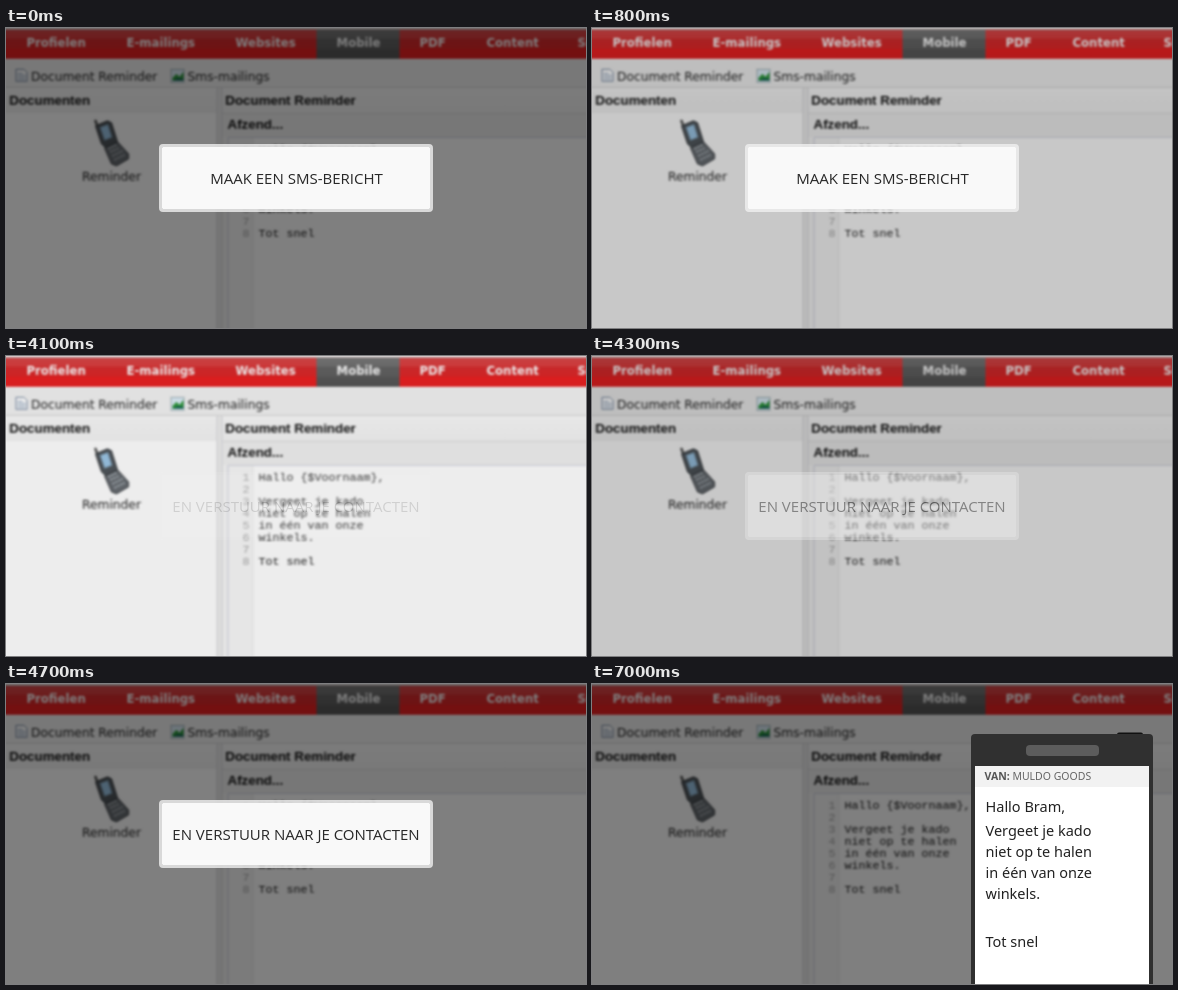
Write an HTML page that moves like this. It is 580x300 px and loops after 8 s.

```html
<!DOCTYPE html>
<html lang="nl">
<head>
<meta charset="utf-8">
<title>Sms-bericht</title>
<style>
html, body { margin: 0; width: 100%; height: 100%; overflow: hidden; background: #fff; }
svg { display: block; }
text { white-space: pre; }
.nav { font: bold 11.7px "DejaVu Sans", sans-serif; fill: #fff; }
.ui { font: 12.25px "DejaVu Sans", sans-serif; fill: #222; }
.head { font: bold 13.35px "Liberation Sans", Arial, sans-serif; fill: #111; }
.code { font: 11.67px "Liberation Mono", monospace; fill: #1c1c1c; }
.code .num { fill: #a5a5a5; text-anchor: end; }
.title { font: 15px "Open Sans", "Noto Sans", sans-serif; fill: #282828; text-anchor: middle; }
.sms { font: 14.5px "Noto Sans", sans-serif; fill: #222; }
.from { font: 10.5px "Noto Sans", sans-serif; fill: #666; }
.from tspan { font-weight: bold; fill: #555; }

.page, .shade, .ask, .send, .phone { animation: 8s infinite step-end; }
.page { animation-name: page; }
.shade { animation-name: shade; }
.ask { animation-name: ask; }
.send { animation-name: send; }
.phone { animation-name: phone; }

/* The blurred page also sits slightly lower than the sharp one. */
@keyframes page {
  0%, 51.25%, 100% { filter: blur(1.25px); transform: translate(.5px, .8px); }
  13.75% { filter: none; transform: none; }
}
@keyframes shade {
  0% { opacity: 1; }
  6.25% { opacity: 1; animation-timing-function: steps(7, start); }
  15% { opacity: 0; }
  51.25% { opacity: 0; animation-timing-function: steps(7, start); }
  60%, 100% { opacity: 1; }
}
@keyframes ask {
  0% { opacity: 1; }
  13.75%, 100% { opacity: 0; }
}
@keyframes send {
  0% { opacity: 0; }
  51.25% { opacity: 0; animation-timing-function: steps(7, start); }
  60% { opacity: 1; }
  87.5%, 100% { opacity: 0; }
}
@keyframes phone {
  0% { transform: translateX(202px); }
  83.75% { transform: translateX(202px); animation-timing-function: steps(4, start); }
  88.75%, 100% { transform: none; }
}
</style>
</head>
<body>
<svg width="580" height="300" viewBox="0 0 580 300">
  <defs>
    <linearGradient id="red" x2="0" y2="1">
      <stop offset="0" stop-color="#d64a4b"/><stop offset=".32" stop-color="#db3c3d"/>
      <stop offset=".32" stop-color="#d62c2e"/><stop offset=".66" stop-color="#de2728"/>
      <stop offset=".66" stop-color="#ec2021"/><stop offset="1" stop-color="#e62122"/>
    </linearGradient>
    <linearGradient id="grey" x2="0" y2="1">
      <stop offset="0" stop-color="#7a7a7a"/><stop offset=".32" stop-color="#707070"/>
      <stop offset=".32" stop-color="#646464"/><stop offset=".66" stop-color="#606060"/>
      <stop offset=".66" stop-color="#595959"/><stop offset="1" stop-color="#555"/>
    </linearGradient>
    <linearGradient id="bar" x2="0" y2="1">
      <stop offset="0" stop-color="#f9f9f9"/><stop offset="1" stop-color="#f3f3f3"/>
    </linearGradient>
    <g id="box">
      <rect x="154.5" y="117.5" width="271" height="65" rx="2.5" fill="none" stroke="#f0f0f0" stroke-opacity=".8" stroke-width="3"/>
      <rect x="156" y="119" width="268" height="62" rx="1" fill="#f9f9f9"/>
    </g>
  </defs>

  <g class="page">
    <rect x="-10" y="30" width="600" height="280" fill="#fff"/>
    <rect x="-10" width="600" height="30" fill="url(#red)"/>
    <rect x="310" width="83" height="30" fill="url(#grey)"/>
    <rect x="-10" width="600" height="1" fill="#b5a0a0"/>
    <g class="nav" id="tabs"></g>

    <rect x="-10" y="31" width="600" height="27" fill="#f2f2f2"/>
    <rect x="-10" y="58" width="600" height="1" fill="#dadada"/>
    <path d="M9.5 40.5h8l3 3v9h-11z" fill="#fff" stroke="#7d8da5"/>
    <path d="M11 44.5h5m-5 2h8m-8 2h8m-8 2h8" stroke="#9fb0c6"/>
    <rect x="164.5" y="40.5" width="13" height="13" fill="#dcecf7" stroke="#a9b8bd"/>
    <path d="M166 52v-3l4-4 3 3 4-5v9z" fill="#2f9a3c"/>
    <path d="M166 52l5-3 6 1v2z" fill="#1c6a55"/>
    <g class="ui">
      <text x="24.5" y="52">Document Reminder</text>
      <text x="181" y="52">Sms-mailings</text>
      <text x="75.5" y="152">Reminder</text>
    </g>

    <rect x="-10" y="59" width="220" height="25" fill="url(#bar)"/>
    <rect x="216" y="59" width="374" height="25" fill="url(#bar)"/>
    <rect x="216" y="84" width="374" height="1" fill="#dedede"/>
    <rect x="216" y="85" width="374" height="23" fill="#f0f0f0"/>
    <rect x="210" y="59" width="6" height="251" fill="#eee"/>
    <path d="M210.5 59v251M215.5 59v251" stroke="#d8d8dc"/>
    <rect x="216" y="108" width="5" height="202" fill="#f5f5f5"/>
    <rect x="222" y="109" width="24" height="201" fill="#f7f7f7"/>
    <path d="M246.5 109v201" stroke="#ececec"/>
    <path d="M590 108.5H221.5V310" fill="none" stroke="#d3d5e0"/>
    <g class="head">
      <text x="2.8" y="76">Documenten</text>
      <text x="218.8" y="76">Document Reminder</text>
      <text x="221" y="100">Afzend...</text>
    </g>
    <g class="code" id="code"></g>

    <g stroke-linejoin="round">
      <path d="M89 92l2 6" stroke="#555" stroke-width="2.5" stroke-linecap="round"/>
      <path d="M89 97l12-5 4 2 6 19-12 6-4-4z" fill="#50565b" stroke="#363a3e"/>
      <path d="M93.500 98.500l8-3 4 13-7.500 3z" fill="#9cc6e6" stroke="#71889a"/>
      <path d="M98 119l13-6 11 12v5l-12 7-5-2z" fill="#686d72" stroke="#363a3e"/>
      <path d="M102 120l8-4m-6 7l9-4m-7 8l10-5m-8 9l10-5" stroke="#b9c1c8" stroke-width="1.5" stroke-dasharray="2 1.2"/>
    </g>
  </g>

  <rect class="shade" width="580" height="300" fill-opacity=".5"/>

  <g class="ask">
    <use href="#box"/>
    <text class="title" x="290.5" y="156">MAAK EEN SMS-BERICHT</text>
  </g>
  <g class="send">
    <use href="#box"/>
    <text class="title" x="290" y="156">EN VERSTUUR NAAR JE CONTACTEN</text>
  </g>

  <g class="phone">
    <rect x="525" y="48.5" width="26" height="6" rx="2" fill="#111"/>
    <rect x="379" y="50" width="182" height="260" rx="4" fill="#303030"/>
    <rect x="434" y="61" width="73" height="11" rx="4" fill="#5c5c5c"/>
    <rect x="383" y="82" width="174" height="218" fill="#fff"/>
    <rect x="383" y="82" width="174" height="21" fill="#f2f2f2"/>
    <text class="from" x="392.5" y="96"><tspan>VAN:</tspan> MULDO GOODS</text>
    <g class="sms" id="sms"></g>
  </g>
</svg>
<script>
const addText = (id, x, y, str, cls = "") => {
  const t = document.createElementNS("http://www.w3.org/2000/svg", "text");
  t.setAttribute("x", x);
  t.setAttribute("y", y);
  t.setAttribute("class", cls);
  t.textContent = str;
  document.getElementById(id).append(t);
};

const tabs = { Profielen: 20, "E-mailings": 120, Websites: 229, Mobile: 330, PDF: 413, Content: 480, Sms: 571 };
for (const [name, x] of Object.entries(tabs)) addText("tabs", x, 18, name);

const body = ["Vergeet je kado", "niet op te halen", "in één van onze", "winkels."];
["Hallo {$Voornaam},", "", ...body, "", "Tot snel"].forEach((line, i) => {
  const y = 124 + 12 * i;
  addText("code", 243, y, i + 1, "num");
  addText("code", 252, y, line);
});

addText("sms", 393.5, 128, "Hallo Bram,");
body.forEach((line, i) => addText("sms", 393.5, 152 + 21 * i, line));
addText("sms", 393.5, 263, "Tot snel");
</script>
</body>
</html>
```
